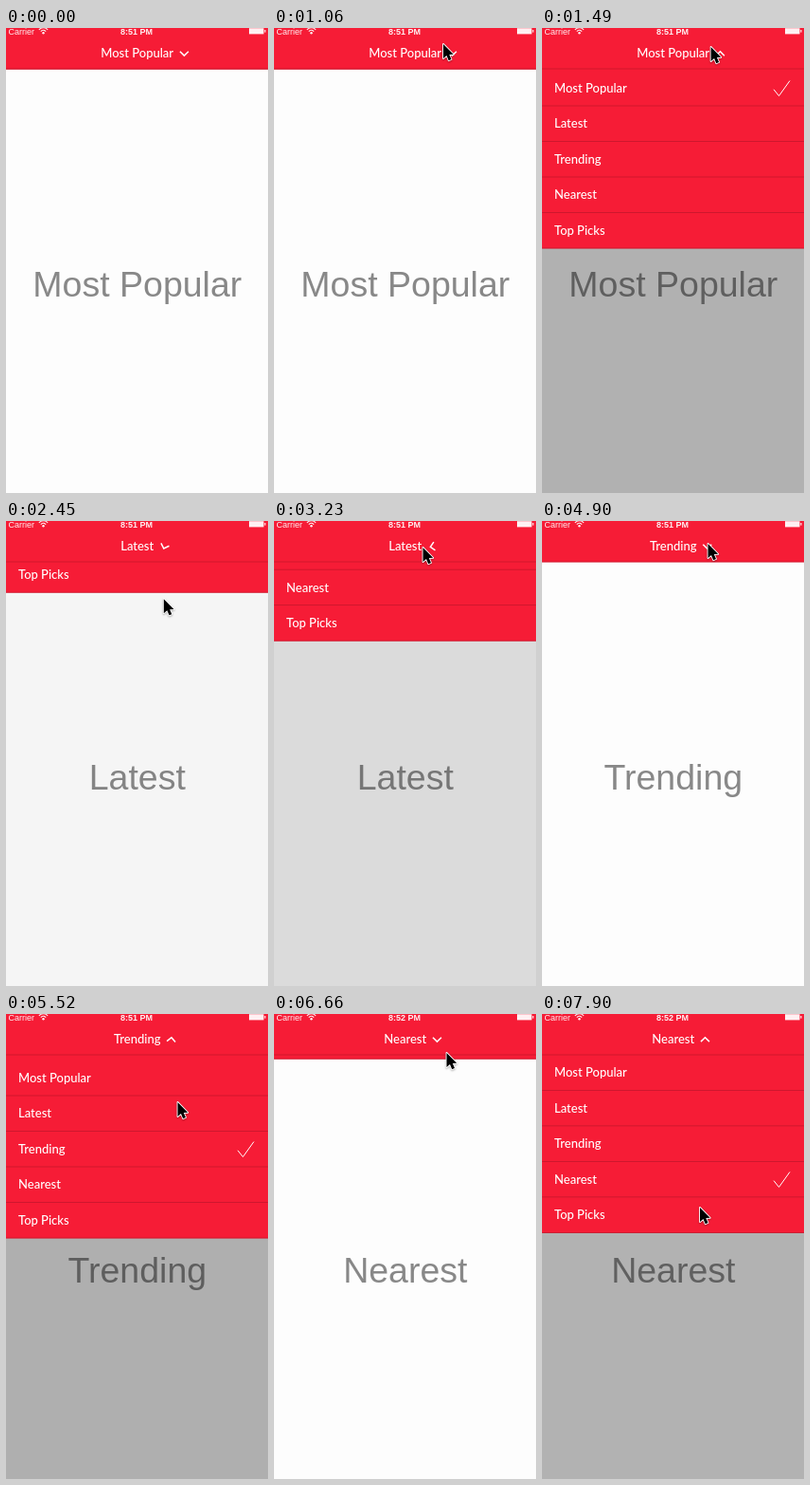
An HTML page with a canvas that plays this animation: 277x490 px, repeating every 7990 ms.

```html
<!DOCTYPE html>
<html lang="en">
<head>
<meta charset="utf-8">
<title>Dropdown menu</title>
<style>
html, body { margin: 0; width: 100%; height: 100%; overflow: hidden; background: #fdfdfd; }
canvas { display: block; width: 277px; height: 490px; }
</style>
</head>
<body>
<canvas id="stage"></canvas>
<script>
const W = 277, H = 490, LOOP = 7990;
const BAR = 43.3, ROW = 37.5, RED = '#f61c36', LINE = '#c5162c';
const ITEMS = ['Most Popular', 'Latest', 'Trending', 'Nearest', 'Top Picks'];
const MENU = ROW * ITEMS.length;

// Menu openings and the choice that closes each one.
const TAPS = [
  { open: 1235, close: 2170, pick: 1 },
  { open: 3132, close: 4080, pick: 2 },
  { open: 5242, close: 6290, pick: 3 },
  { open: 7080, close: Infinity, pick: 3 }
];

// Pointer stops: time, x, y.
const PATH = [
  [450, 244, 84], [800, 189, 13], [1060, 178.5, 17], [1420, 178.5, 17],
  [2010, 168, 92], [2280, 168, 92], [2970, 157, 28], [3230, 157, 28],
  [3920, 166, 131], [4190, 166, 131], [4810, 174, 25], [4900, 175, 24],
  [5250, 175, 24], [5520, 181, 93], [6040, 171, 168], [6130, 170.5, 170],
  [6300, 170.5, 170], [6660, 182, 41], [6920, 174, 25], [7180, 174, 25],
  [7810, 165.5, 199], [7900, 166.5, 204]
];

const canvas = document.getElementById('stage');
const ctx = canvas.getContext('2d');
const dpr = window.devicePixelRatio || 1;
canvas.width = W * dpr;
canvas.height = H * dpr;

const clamp = v => Math.max(0, Math.min(1, v));
const ease = v => { v = clamp(v); return v * v * (3 - 2 * v); };
// Remaining distance of a damped spring after s seconds.
const spring = s => Math.exp(-9.2 * s) * (Math.cos(9.4 * s) + 0.98 * Math.sin(9.4 * s));

function stateAt(t) {
  let picked = 0, shown = 0, offset = -MENU;
  for (const tap of TAPS) {
    if (t >= tap.close) {
      const s = (t - tap.close) / 1000, e = ease(s / 0.35);
      picked = tap.pick;
      shown = 1 - e;
      offset = -MENU - 100 * spring(s) + (MENU + 100) * (1 - e);
    } else if (t >= tap.open) {
      const left = spring((t - tap.open) / 1000);
      shown = 1 - left;
      offset = -MENU * left;
    }
  }
  return { picked, shown, offset };
}

function pointerAt(t) {
  if (t < PATH[0][0]) return null;
  const i = PATH.findIndex(p => p[0] > t);
  if (i < 0) return PATH[PATH.length - 1].slice(1);
  const a = PATH[i - 1], b = PATH[i];
  const k = ease((t - a[0]) / (b[0] - a[0]));
  return [a[1] + (b[1] - a[1]) * k, a[2] + (b[2] - a[2]) * k];
}

function text(str, x, y, font, color, align = 'left') {
  ctx.font = font;
  ctx.fillStyle = color;
  ctx.textAlign = align;
  ctx.fillText(str, x, y);
  return ctx.measureText(str).width;
}

function trace(points) {
  ctx.beginPath();
  points.forEach(([x, y]) => ctx.lineTo(x, y));
}

function stroke(points, width, color = '#fff') {
  trace(points);
  ctx.lineWidth = width;
  ctx.strokeStyle = color;
  ctx.stroke();
}

function rect(x, y, w, h, color) {
  ctx.fillStyle = color;
  ctx.fillRect(x, y, w, h);
}

function drawMenu({ picked, offset }) {
  const top = BAR + offset;
  if (top + MENU <= BAR) return;
  rect(0, 0, W, top + MENU, RED);
  ITEMS.forEach((item, i) => {
    const y = top + ROW * i, mid = y + ROW / 2;
    text(item, 13, mid + 4.4, '500 13px Lato, sans-serif', '#fff');
    rect(0, y + ROW - 0.7, W, 0.8, LINE);
    if (i === picked) stroke([[245, mid + 1.2], [250.5, mid + 8], [262, mid - 8]], 1);
  });
}

function drawStatus(t) {
  const white = '#fff0f2';
  text('Carrier', 2.5, 6.6, '9px "Liberation Sans", Arial, sans-serif', white);
  text(t < 5700 ? '8:51 PM' : '8:52 PM', 138, 6.6,
    'bold 9px "Liberation Sans", Arial, sans-serif', white, 'center');
  ctx.strokeStyle = white;
  ctx.lineWidth = 1.1;
  for (const r of [3.6, 6.2]) {
    ctx.beginPath();
    ctx.arc(39.5, 6, r, -Math.PI * 0.77, -Math.PI * 0.23);
    ctx.stroke();
  }
  ctx.beginPath();
  ctx.arc(39.5, 5.2, 1.2, 0, Math.PI * 2);
  ctx.fillStyle = white;
  ctx.fill();
  rect(257, 0.2, 15.5, 6.2, white);
  rect(273.3, 2, 1.2, 2.6, white);
}

function drawBar(t, { picked, shown }) {
  rect(0, 0, W, BAR, RED);
  rect(0, BAR - 0.7, W, 0.8, LINE);
  drawStatus(t);
  const w = text(ITEMS[picked], 138.7, 31.2, '500 13px Lato, sans-serif', '#fff', 'center');
  ctx.save();
  ctx.translate(138.7 + w / 2 + 11.3, 26.9);
  ctx.rotate(Math.PI * shown);
  stroke([[-4.5, -2.2], [0, 2.2], [4.5, -2.2]], 1.5);
  ctx.restore();
}

function drawPointer([x, y]) {
  ctx.save();
  ctx.translate(x, y);
  trace([[0.5, 0], [0.5, 15], [4, 12], [6.2, 17.2], [9, 16], [6.8, 11], [11.2, 10.8]]);
  ctx.closePath();
  ctx.shadowColor = 'rgba(0,0,0,.3)';
  ctx.shadowBlur = 2 * dpr;
  ctx.shadowOffsetY = dpr;
  ctx.lineJoin = 'round';
  ctx.lineWidth = 1.8;
  ctx.strokeStyle = '#fff';
  ctx.stroke();
  ctx.shadowColor = 'transparent';
  ctx.fillStyle = '#000';
  ctx.fill();
  ctx.restore();
}

function draw(t) {
  const state = stateAt(t), pointer = pointerAt(t);
  ctx.setTransform(dpr, 0, 0, dpr, 0, 0);
  rect(0, 0, W, H, '#fdfdfd');
  text(ITEMS[state.picked], 138.8, 283.3,
    '37.5px "Liberation Sans", Arial, sans-serif', '#888', 'center');
  rect(0, BAR, W, H - BAR, `rgba(0,0,0,${Math.max(0, 0.3 * state.shown).toFixed(4)})`);
  drawMenu(state);
  drawBar(t, state);
  if (pointer) drawPointer(pointer);
}

const start = performance.now();
function tick() {
  draw((performance.now() - start) % LOOP);
  requestAnimationFrame(tick);
}
tick();
</script>
</body>
</html>
```
